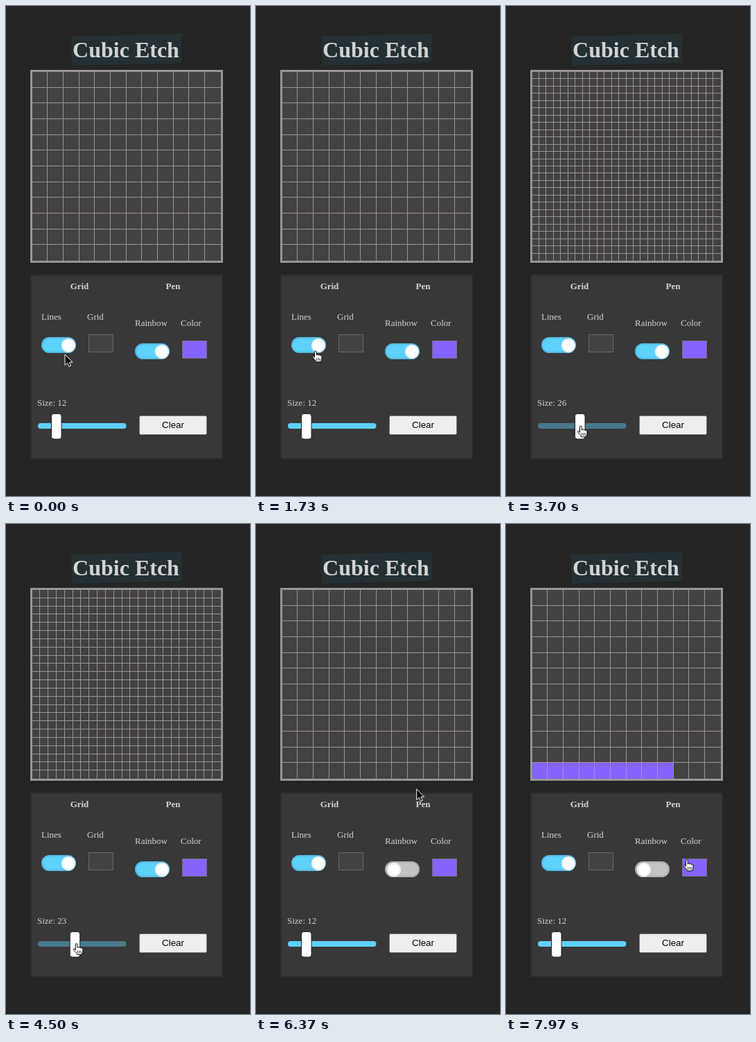
An HTML page that plays this animation: 352 px wide and 706 px high, repeating every 8 s.

```html
<!DOCTYPE html>
<html lang="en">
<head>
<meta charset="utf-8">
<title>Cubic Etch</title>
<style>
  html, body { margin: 0; width: 100%; height: 100%; overflow: hidden; background: #242424; }
  svg { display: block; width: 100%; height: 100%; }
  text { font: 13px "Liberation Serif", serif; fill: #d3d3d3; }
  .title { font-size: 32px; font-weight: bold; text-anchor: middle; }
  .head { font-weight: bold; text-anchor: middle; }
  .button { font: 13.33px "Liberation Sans", sans-serif; fill: #000; text-anchor: middle; }
  .crisp { shape-rendering: crispEdges; }
</style>
</head>
<body>
<svg viewBox="0 0 352 706">
  <defs>
    <radialGradient id="knob">
      <stop offset=".65" stop-color="#fff"/>
      <stop offset="1" stop-color="#dfe8ee"/>
    </radialGradient>
    <g id="arrow" stroke="#fff" stroke-linejoin="round">
      <path d="M0 0V15.5L3.6 12.2L6 17.6L8.6 16.4L6.2 11.2H11Z" fill="#000"/>
    </g>
    <g id="hand" stroke="#000" stroke-linejoin="round" stroke-linecap="round">
      <path fill="#fff" d="M-1.6 9V1.4C-1.6-.4 1.2-.4 1.2 1.4V6C1.4 4.6 3.8 4.6 4 6.2C4.4 5 6.4 5.2 6.6 6.8C7.2 5.8 9 6.2 9 8V11C9 13 7.8 13.6 7.6 15.8H.6C.4 13.6-2.4 12-4.2 9C-5 7.4-3.2 6.6-2.2 8Z"/>
      <path fill="none" stroke-width=".8" d="M1.6 10.5V13.6M4 10.5V13.6M6.2 10.5V13.6"/>
    </g>
    <g id="cross" fill="none">
      <path d="M-7 0H7M0-7V7" stroke="#fff" stroke-width="3.4"/>
      <path d="M-6 0H6M0-6V6" stroke="#000" stroke-width="1.2"/>
    </g>
    <g id="shade" fill="none" stroke="#000">
      <rect x=".75" y=".75" width="48.5" height="21.5" rx="10.7" stroke-width="1.5" stroke-opacity=".13"/>
      <rect x="2" y="2" width="46" height="19" rx="9.5" stroke-opacity=".05"/>
    </g>
  </defs>

  <path d="M94 44L254 40L253.5 82L95 86Z" fill="#243033"/>
  <text class="title" x="173" y="74">Cubic Etch</text>

  <g class="crisp">
    <rect x="36" y="93" width="276" height="276" fill="#444142" stroke="#979596" stroke-width="2"/>
    <rect id="paint" y="343" height="25" fill="#8563ff"/>
    <rect id="hover" y="343" height="25" fill="#444142" fill-opacity=".45"/>
    <path id="lines" fill="none" stroke="#979596"/>
    <path id="paintLines" fill="none" stroke="#a08cf2"/>
  </g>

  <rect x="36" y="387.5" width="276" height="264.5" fill="#383838" stroke="#2d2d2d" stroke-width="2"/>
  <text class="head" x="106" y="408">Grid</text>
  <text class="head" x="241" y="408">Pen</text>
  <text x="51" y="452">Lines</text>
  <text x="117" y="452">Grid</text>
  <text x="186" y="461">Rainbow</text>
  <text x="252" y="461">Color</text>
  <text id="size" x="45" y="576">Size: 12</text>

  <g id="linesToggle" transform="translate(51 477)">
    <rect width="50" height="23" rx="11.5"/><use href="#shade"/>
    <circle cy="12" r="10.3" fill="url(#knob)"/>
  </g>
  <g id="rainbowToggle" transform="translate(186 486)">
    <rect width="50" height="23" rx="11.5"/><use href="#shade"/>
    <circle cy="12" r="10.3" fill="url(#knob)"/>
  </g>

  <rect x="119.5" y="473.5" width="35" height="25" fill="#444142" stroke="#6a6869"/>
  <rect x="254.5" y="482.5" width="35" height="25" fill="#8563ff" stroke="#757080"/>

  <rect id="track" x="46" y="601" width="127.5" height="8" rx="4"/>
  <rect id="thumb" y="587.5" width="14.5" height="36.5" rx="3.5" fill="#fff" stroke="#222"/>

  <rect x="192.5" y="590.5" width="97" height="27" rx="2" fill="#eee" stroke="#777"/>
  <text class="button" x="241" y="608">Clear</text>

  <use id="cursor"/>
</svg>
<script>
const LOOP = 8000;
const LINES_OFF = 400, LINES_ON = 1300, GRAB = 3150, DROP = 4850, RAINBOW_OFF = 5600;
const PAINT_START = 6650, PAINT_END = 7460;

// time, x, y of the pointer tip
const path = [
  [0, 85, 502], [120, 85, 502], [300, 86, 497], [1720, 86, 497],
  [2500, 67, 609], [2750, 67, 609], [GRAB, 74, 606], [3370, 74, 606],
  [3700, 108, 605], [4000, 130, 606], [4250, 130, 605], [4750, 74, 604],
  [DROP, 74, 604], [5400, 221, 499], [5850, 221, 499], [6560, 234, 357],
  [6650, 232, 357], [7070, 154, 357], [7460, 43, 357], [7540, 43, 357],
  [7860, 264, 490], [7970, 261, 484], [LOOP, 261, 484]
];
// areas with a pointing hand: left, top, right, bottom
const hotAreas = [
  [51, 477, 101, 500], [119, 473, 155, 499], [186, 486, 236, 509],
  [254, 482, 290, 508], [46, 587, 173, 625]
];

const el = id => document.getElementById(id);
const set = (node, attrs) => { for (const k in attrs) node.setAttribute(k, attrs[k]); };
const clamp = v => Math.min(1, Math.max(0, v));
const smooth = v => v * v * (3 - 2 * v);
const ramp = (t, start) => smooth(clamp((t - start) / 400));
const within = (x, y, [l, t, r, b]) => x >= l && x <= r && y >= t && y <= b;

function pointer(t) {
  const i = path.findIndex(p => p[0] > t);
  const [t0, x0, y0] = path[i - 1], [t1, x1, y1] = path[i];
  const raw = (t - t0) / (t1 - t0);
  const k = t >= PAINT_START && t < PAINT_END ? raw : smooth(raw);
  return [x0 + (x1 - x0) * k, y0 + (y1 - y0) * k];
}

const lineX = (i, n) => Math.round(36.5 + 272 * i / n);
const lineY = (i, n) => Math.round(94 + 272 * i / n);
const column = x => Math.max(0, Math.min(11, Math.floor((x - 36.5) / 272 * 12)));
const edge = i => i <= 0 ? 38 : lineX(i, 12);

function gridPath(n) {
  let d = "M37.5 94.5H310.5V367.5H37.5Z";
  for (let i = 1; i < n; i++)
    d += `M${lineX(i, n) + .5} 94V368M37 ${lineY(i, n) + .5}H311`;
  return d;
}

function drawToggle(id, on) {
  const [track, , knob] = el(id).children;
  const mix = (a, b) => Math.round(a + (b - a) * on);
  set(track, { fill: `rgb(${mix(195, 94)},${mix(195, 209)},${mix(195, 253)})` });
  set(knob, { cx: 13 + 26 * on });
}

function drawPaint(t, x, y) {
  const painting = t >= PAINT_START;
  const first = painting ? column(pointer(Math.min(t, PAINT_END))[0]) : 9;
  set(el("paint"), { x: edge(first), width: edge(9) - edge(first) });
  const hovered = column(x);
  const over = painting && within(x, y, [37, 343, 311, 368]);
  set(el("hover"), { x: edge(hovered), width: over ? edge(hovered + 1) - edge(hovered) : 0 });
  let d = "";
  for (let i = first + 1; i < 9; i++) d += `M${edge(i) + .5} 344V367`;
  set(el("paintLines"), { d });
}

function draw(t) {
  const [x, y] = pointer(t);
  const dragging = t >= GRAB && t < DROP;
  const size = dragging ? Math.round(12 + (x - 74) / 2.43) : 12;
  const showLines = t < LINES_OFF || t >= LINES_ON;

  set(el("lines"), { d: showLines ? gridPath(size) : "" });
  drawPaint(t, x, y);
  drawToggle("linesToggle", 1 - ramp(t, LINES_OFF) + ramp(t, LINES_ON));
  drawToggle("rainbowToggle", 1 - ramp(t, RAINBOW_OFF));

  const focused = t >= GRAB && t < RAINBOW_OFF;
  set(el("track"), { fill: focused ? "#47798c" : "#5ed1fd" });
  set(el("thumb"), { x: 65.5 + (size - 12) * 2.43 });
  el("size").textContent = "Size: " + size;

  const inGrid = within(x, y, [35, 92, 313, 370]);
  const hot = dragging || hotAreas.some(area => within(x, y, area));
  set(el("cursor"), {
    href: inGrid ? "#cross" : hot ? "#hand" : "#arrow",
    transform: `translate(${x} ${y})`
  });
}

const start = performance.now();
function tick() {
  draw((performance.now() - start) % LOOP);
  requestAnimationFrame(tick);
}
tick();
</script>
</body>
</html>
```
